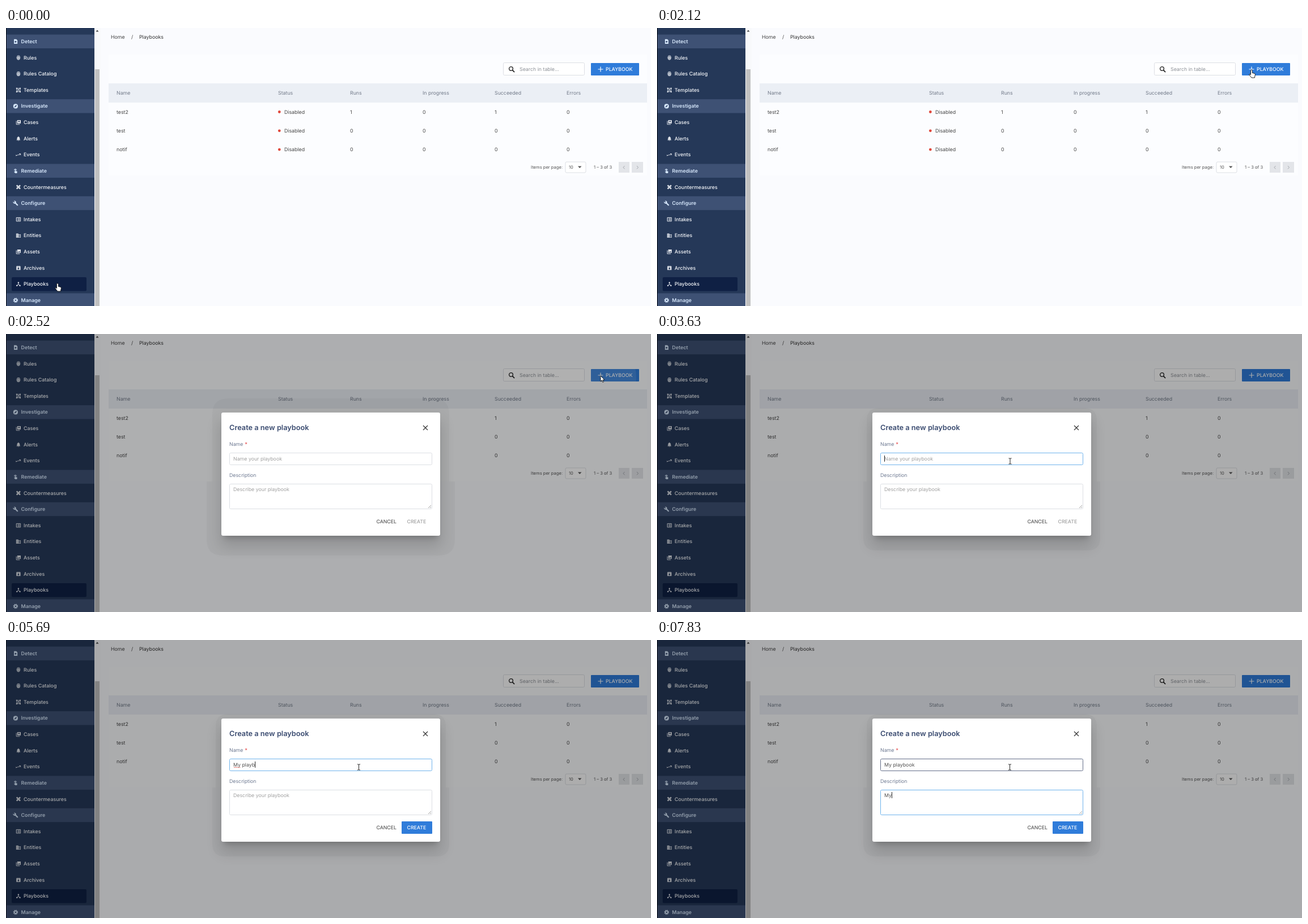
These frames come from a looping animation (1138 px wide and 492 px high, 8 s). An HTML page:

```html
<!DOCTYPE html>
<html lang="en">
<head>
<meta charset="utf-8">
<title>Create a playbook</title>
<style>
html, body { margin: 0; height: 100%; overflow: hidden; background: #fafcfe; }
svg { display: block; width: 100vw; height: 100vh; }
text { font: 400 8.8px Inter, "Open Sans", sans-serif; white-space: pre; text-rendering: geometricPrecision; }
.line { fill: none; stroke: currentColor; stroke-width: 2.4; }
</style>
</head>
<body>
<svg id="stage" viewBox="0 0 1138 492" preserveAspectRatio="none"></svg>
<script>
const LOOP = 8000;
const stage = document.getElementById('stage');
const $ = id => document.getElementById(id);

// y is the middle of the line
const text = (x, y, s, fill = '#444', size = 8.8, weight = 400, more = '') =>
  `<text x="${x}" y="${y + size * .36}" fill="${fill}" style="font-size:${size}px;font-weight:${weight}" ${more}>${s}</text>`;
const box = (x1, y1, x2, y2, fill, more = '') =>
  `<rect x="${x1}" y="${y1}" width="${x2 - x1}" height="${y2 - y1}" fill="${fill}" ${more}/>`;
const frame = (x1, y1, x2, y2, more = '') =>
  box(x1 + .5, y1 + .5, x2 - .5, y2 - .5, '#fff', `rx="2" stroke="#dcdfe4" ${more}`);
const line = (d, color, width = 1, more = '') =>
  `<path d="${d}" fill="none" stroke="${color}" stroke-width="${width}" ${more}/>`;

// Icons on a 24 unit grid
const solid = d => `<path d="${d}" fill="currentColor" fill-rule="evenodd"/>`;
const thin = d => `<path d="${d}" class="line"/>`;
const icons = {
  detect: solid('M5 2h10l5 5v15H5zM12 9a4 4 0 1 0 0 8 4 4 0 0 0 0-8z') + thin('M14 15l4 4'),
  print: solid('M12 2C6 2 4 6 4 12s3 10 8 10 8-4 8-10S18 2 12 2z') +
    line('M7 20V11a5 5 0 0 1 10 0v9M12 10v12M5 8q7-7 14 0', '#253858', 1.2),
  template: thin('M5 5h14v14H5zM9 16l3-8 3 8') + solid('M2 2h5v5H2zM17 2h5v5h-5zM2 17h5v5H2zM17 17h5v5h-5z'),
  compass: solid('M12 2a10 10 0 1 0 0 20 10 10 0 0 0 0-20zM18 6l-4 8-8 4 4-8z'),
  cases: solid('M7 2h15v15H7zM12 5v7l2.5-2 2.5 2V5z') + thin('M3 6v15h15'),
  bell: solid('M12 22a2 2 0 0 0 2-2h-4a2 2 0 0 0 2 2zm6-6v-5c0-3-1.6-5.6-4.5-6.3V4a1.5 1.5 0 0 0-3 0v.7C7.6 5.4 6 8 6 11v5l-2 2v1h16v-1z'),
  events: thin('M2 15h5l4-4 3 3 6-6M15 8h6v6') + solid('M1 12l5 3-5 3z'),
  touch: solid('M9 11V7a2 2 0 0 1 4 0v5l6 2-1 8h-8l-5-6 1-1 3 1z') + thin('M6 9a5 5 0 1 1 10 0'),
  plaster: `<g transform="rotate(45 12 12)">${solid('M9 1h6v8h8v6h-8v8H9v-8H1V9h8zM11 11v2h2v-2z')}</g>`,
  wrench: solid('M22.7 19l-9-9c1-2.3.4-5-1.5-7-2-2-5-2.4-7.4-1.3L9 6 6 9 1.6 4.7C.4 7 1 10 3 12c1.9 1.9 4.6 2.4 6.9 1.5l9 9q.8.7 1.5 0l2.3-2.3q.7-.7 0-1.2z'),
  list: thin('M3 4h18v16H3zM6 8h2M10 8h8M6 12h2M10 12h8M6 16h2M10 16h8'),
  building: solid('M2 3h10v4h10v14H2zM4 6v2h2V6zM8 6v2h2V6zM4 11v2h2v-2zM8 11v2h2v-2zM4 16v2h2v-2zM8 16v2h2v-2zM13 9v10h7V9z') + solid('M15 11h3v2h-3zM15 15h3v2h-3z'),
  images: solid('M7 2h15v15H7zM9 14h11l-4-5-3 4-2-2z') + thin('M3 6v15h15'),
  archive: solid('M5 3h14l2 3v15H3V6zM6 5v1h12V5zM10 10v4H7l5 5 5-5h-3v-4z'),
  fork: solid('M17 16l-4-4V8.8a3 3 0 1 0-2 0V12l-4 4H3v5h5v-3l4-4.2L16 18v3h5v-5z'),
  gear: '<circle cx="12" cy="12" r="5.5" class="line" style="stroke-width:4"/><circle cx="12" cy="12" r="8.7" class="line" style="stroke-width:3.6" stroke-dasharray="3.83 3"/>'
};
const menu = [
  ['Detect', 'detect', 1], ['Rules', 'print'], ['Rules Catalog', 'print'], ['Templates', 'template'],
  ['Investigate', 'compass', 1], ['Cases', 'cases'], ['Alerts', 'bell'], ['Events', 'events'],
  ['Remediate', 'touch', 1], ['Countermeasures', 'plaster'],
  ['Configure', 'wrench', 1], ['Intakes', 'list'], ['Entities', 'building'], ['Assets', 'images'],
  ['Archives', 'archive'], ['Playbooks', 'fork'], ['Manage', 'gear', 1]
];

const sidebar = box(0, 0, 156, 492, '#253858') + box(10, 441, 142, 465.5, '#0f2044', 'rx="2"') +
  menu.map(([name, icon, head], i) => {
    const y = 23.8 + i * 28.62;
    return (head ? box(0, y - 12.2, 156, y + 12.2, '#3e5174') : '') +
      `<g color="${head ? '#d6e7fb' : '#dde1e8'}" transform="translate(${head ? 12 : 17} ${y - 4.8}) scale(.41)">${icons[icon]}</g>` +
      text(head ? 26.5 : 31, y, name, head ? '#d6e7fb' : '#f6f8fb', 8.9, head ? 600 : 550);
  }).join('') +
  box(156, 0, 167, 492, '#f8f9fb') + box(157, 73, 165, 492, '#c1c1c1') +
  '<path d="M158.5 6.5h5l-2.5-3z" fill="#444"/>';

const columns = [195, 480, 607, 735, 862, 989];
const rows = [['test2', 1, 0, 1, 0], ['test', 0, 0, 0, 0], ['notif', 0, 0, 0, 0]];
const table = box(181, 98, 1131, 132, '#ebeff5') +
  box(181, 132, 1131, 165, '#f5f8fc', 'id="hover"') +
  ['Name', 'Status', 'Runs', 'In progress', 'Succeeded', 'Errors']
    .map((s, i) => text(columns[i], 115, s, '#727a89')).join('') +
  rows.map(([name, ...counts], i) => {
    const y = 148.5 + i * 33.3;
    return text(195, y, name) + `<circle cx="482.3" cy="${y}" r="2.4" fill="#e0493d"/>` +
      text(491, y, 'Disabled') + counts.map((n, c) => text(columns[c + 2], y, n)).join('');
  }).join('');

const addButton = box(1032, 62, 1117, 84, '#2f7cda', 'rx="1"') +
  '<clipPath id="clip"><rect x="1032" y="62" width="85" height="22"/></clipPath>' +
  '<circle id="ripple" cx="1049" cy="76" fill="#fff" opacity=".1" clip-path="url(#clip)"/>' +
  line('M1044.5 73h9M1049 68.5v9', '#fff', 1.2) + text(1058, 73, 'PLAYBOOK', '#fff', 8.8, 500);

const page = box(167, 0, 1138, 492, '#fafbfe') + box(181, 47, 1131, 261, '#fcfdff') +
  text(185, 16, 'Home') + text(221, 16, '/') + text(235, 16, 'Playbooks', '#333') +
  frame(877, 61, 1021, 84) +
  `<g color="#222" transform="translate(885.5 66.5) scale(.58)">
    <circle cx="9.5" cy="9.5" r="5.8" class="line"/><path d="M14 14l6 6" class="line" style="stroke-width:3"/></g>` +
  text(906, 73, 'Search in table...', '#8d9197') + addButton + table +
  text(926, 246.5, 'Items per page:', '#555', 7.6) + frame(986.5, 236.5, 1023.5, 256.5) +
  text(993, 246.5, '10', '#555', 7.6) + '<path d="M1009 244.5h6.5l-3.25 3.5z" fill="#555"/>' +
  text(1037, 246.5, '1 – 3 of 3', '#555', 7.6) +
  box(1081, 237, 1100, 256, '#e3e5e9') + box(1104, 237, 1124, 256, '#e3e5e9') +
  line('M1091.5 244l-2.5 2.7 2.5 2.7M1113 244l2.5 2.7-2.5 2.7', '#a2a6ac');

// Dialog shadow layers: spread, drop, blur, strength
const shadow = [[-5, 8, 5, .2], [2, 17, 13, .14]].map(([s, drop, blur, a]) =>
  box(380 - s, 139 - s + drop, 766 + s, 357 + s + drop, '#000', `rx="3" opacity="${a}" style="filter:blur(${blur}px)"`)).join('');

const dialog = shadow + box(380, 139, 766, 357, '#fff', 'rx="3"') +
  text(394, 165.5, 'Create a new playbook', '#3a4b70', 12.75, 600) +
  line('M736 162l8 8M744 162l-8 8', '#333', 1.2) +
  text(394, 195, 'Name', '#6d7991') + text(421.5, 195, '*', '#e33b3b') +
  frame(394, 210, 752, 232, 'id="nameBox"') + text(401, 220.7, '', '#444', 8.8, 400, 'id="name"') +
  line('M402 225.5h11.5', '#e2574f', 1, 'id="typo" stroke-dasharray="1.5 .7"') +
  text(394, 250, 'Description', '#6d7991') +
  frame(394, 265, 752, 310, 'id="descBox"') + text(401, 274.5, '', '#444', 8.8, 400, 'id="desc"') +
  line('M745 308l5-5M748 308l2-2', '#888', .8) +
  text(653.5, 332, 'CANCEL', '#3c3c3c', 8.75) +
  box(698, 321, 752, 343, '#2f7cda', 'id="create" rx="1"') +
  text(707.5, 332, 'CREATE', '#999', 8.75, 450, 'id="createText"') +
  box(0, 0, 1, 11, '#222', 'id="caret"');

stage.innerHTML = page + sidebar + box(0, 0, 1138, 492, '#000', 'id="shade"') + box(0, 0, 1, 492, '#10131c') +
  `<path id="halo" opacity=".03"/><g id="dialog">${dialog}</g>
  <g id="cursor">
    <path id="hand" d="M-1.5 1.3a1.4 1.4 0 0 1 2.8 0v4.2l3.7.8q1.5.5 1.4 2.2l-1 5.5h-5.4L-4 9q-.6-1.6 1-1.4l1.5 1.2z" fill="#fff" stroke="#111" stroke-width=".9"/>
    <path id="arrow" d="M0 0v10l2.3-2.2 1.6 3.6 1.6-.7-1.6-3.5h3.2z" fill="#fff" stroke="#111" stroke-width=".9"/>
    <path id="beam" d="M-2.5-5h2l.5.7.5-.7h2M-2.5 5h2l.5-.7.5.7h2M0-4.5v9" fill="none" stroke="#222"/>
  </g>`;

const set = (id, attrs) => { for (const k in attrs) $(id).setAttribute(k, attrs[k]); };
const show = (id, on) => { $(id).style.display = on ? '' : 'none'; };

// Faint halo around x = 573, wider below the table's lower edge
const halo = (w, top, low, bottom, r) =>
  `M${573 - w} 261V${top + r}q0-${r} ${r}-${r}H${573 + w - r}q${r} 0 ${r} ${r}V261H${573 + low}` +
  `V${bottom - r}q0 ${r}-${r} ${r}H${573 - low + r}q-${r} 0-${r}-${r}V261z`;

// Pointer legs: first step, last step, number of steps, end point
const legs = [[590, 1580, 8, 960, 138], [1700, 2120, 4, 1049, 74], [2670, 3360, 6, 623, 225]];
function pointer(t) {
  let x = 91, y = 452;
  for (const [from, to, n, ex, ey] of legs) {
    if (t < from) break;
    const k = Math.min(n, 1 + Math.floor((t - from) / (to - from) * (n - 1) + 1e-6)) / n;
    const p = k * k * (3 - 2 * k);
    x += (ex - x) * p;
    y += (ey - y) * p;
  }
  return [x, y];
}

const nameKeys = [4090, 4240, 4670, 4820, 4960, 5270, 5390, 5690, 5960, 6140, 6330];
const descKeys = [7270, 7830];
const typed = (s, keys, t) => s.slice(0, keys.filter(k => t >= k).length);

// Fills a field and returns where its caret stands
function field(id, value, hint) {
  $(id).textContent = value || hint;
  $(id).setAttribute('fill', value ? '#505050' : '#a0a0a0');
  return value ? 401 + $(id).getComputedTextLength() : 401;
}

function draw(t) {
  const open = t >= 2400, opening = open && t < 2520, inDesc = t >= 6790;
  set('shade', { opacity: !open ? 0 : opening ? .08 : t < 2670 ? .31 : .32 });
  set('ripple', { r: opening ? 41 : 63 });
  show('ripple', open && t < 2820);

  show('halo', open);
  show('dialog', open);
  set('halo', {
    d: opening ? halo(174, 154, 194, 376, 22) : t < 2670 ? halo(209, 114, 219, 392, 28) : halo(203, 131, 209, 383, 22)
  });
  set('dialog', {
    opacity: opening ? .55 : 1,
    transform: opening ? 'translate(573 248) scale(.86) translate(-573 -248)' : ''
  });

  const nameEnd = field('name', typed('My playbook', nameKeys, t), 'Name your playbook');
  const descEnd = field('desc', typed('My', descKeys, t), 'Describe your playbook');
  set('nameBox', { stroke: inDesc ? '#626d88' : t >= 3480 ? '#6fb3ec' : '#dcdfe4' });
  set('descBox', { stroke: inDesc ? '#6fb3ec' : '#dcdfe4' });
  set('caret', { x: inDesc ? descEnd : nameEnd, y: inDesc ? 269 : 215 });
  show('caret', t >= 3630);
  show('typo', t >= 4670 && !inDesc);
  set('create', { opacity: t < 4090 ? 0 : t < 4240 ? .6 : 1 });
  set('createText', { fill: t < 4090 ? '#a0a0a0' : '#fff' });

  const [x, y] = pointer(t);
  const beam = t >= 3360;
  const hand = !open && (t < 590 || x > 1030 && y < 84);
  set('cursor', { transform: `translate(${x - (t >= 3780 ? .5 : 0)} ${y})` });
  show('hand', hand);
  show('beam', beam);
  show('arrow', !hand && !beam);
  const row = Math.floor((y - 132) / 33.3);
  show('hover', !open && x > 181 && row >= 0 && row < 3);
  set('hover', { y: 132 + row * 33.3 });
}

const start = performance.now();
function tick() {
  draw((performance.now() - start) % LOOP);
  requestAnimationFrame(tick);
}
tick();
</script>
</body>
</html>
```
